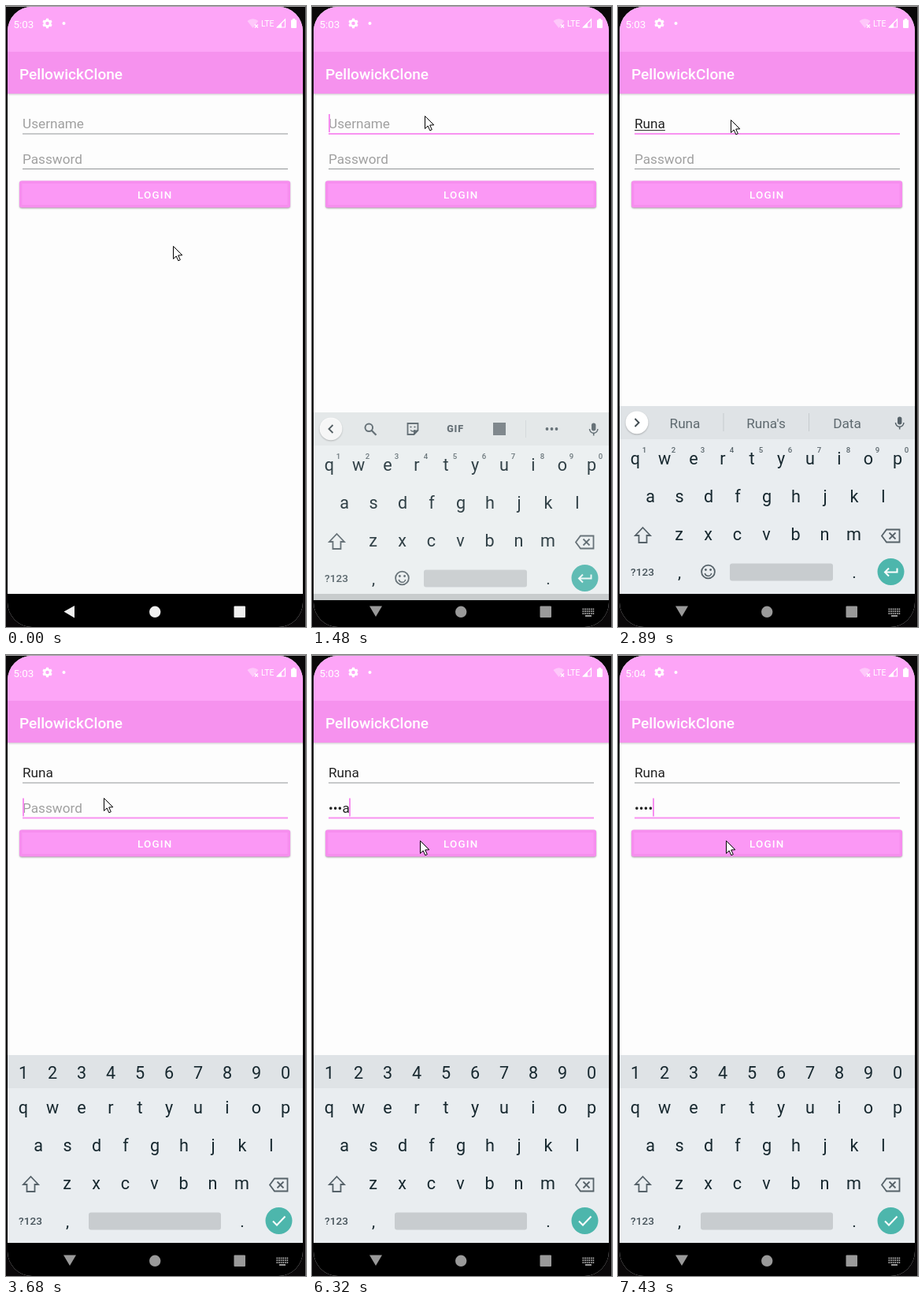
An HTML page with a canvas that plays this animation: 381 by 787 pixels, repeating every 8 s.

```html
<!DOCTYPE html>
<html lang="en">
<head>
<meta charset="utf-8">
<style>
html, body { margin: 0; width: 100%; height: 100%; overflow: hidden; background: #0a0809; }
canvas { display: block; }
</style>
</head>
<body>
<canvas id="stage" width="381" height="787"></canvas>
<script>
const ctx = document.getElementById('stage').getContext('2d');
const LOOP = 8000;
const PINK = '#f78ff0', KEY = '#17282f', ICON = '#566269';

// Held values: [start time, ...values]
const pointer = [
  [0, 212, 304], [150, 207, 278], [280, 186, 205], [410, 160, 136],
  [540, 148, 123], [670, 143, 139], [2890, 143, 144], [3020, 139, 154],
  [3200, 130, 172], [3390, 124, 181], [5900, 125, 188], [6050, 130, 208],
  [6190, 135, 228], [6320, 137, 235]
];
const userText = [[0, ''], [1900, 'R'], [2220, 'Run'], [2340, 'Runa']];
const passText = [[0, ''], [4350, 'R'], [5130, '•u'], [5270, '••n'], [5400, '•••a'], [6850, '••••']];
const suggestions = [
  [1900, 'Run', 'Real', 'Read'], [2220, 'Run', 'Runs', 'Runa'], [2340, 'Runa', "Runa's", 'Data']
];
const userCaret = [[0, false], [940, true], [2890, false]];
const passCaret = [
  [0, false], [3390, true], [4100, false], [4350, true], [4880, false],
  [5130, true], [5900, false], [6320, true], [6850, false], [7280, true]
];

const held = (list, t) => list.filter(k => k[0] <= t).pop().slice(1);
const between = (t, a, b) => t >= a && t < b;

function rect(x, y, w, h, color) {
  ctx.fillStyle = color;
  ctx.fillRect(x, y, w, h);
}
function round(x, y, w, h, r, color) {
  ctx.beginPath();
  ctx.roundRect(x, y, w, h, r);
  ctx.fillStyle = color;
  ctx.fill();
}
function disc(x, y, r, color) {
  ctx.beginPath();
  ctx.arc(x, y, r, 0, Math.PI * 2);
  ctx.fillStyle = color;
  ctx.fill();
}
function path(points, closed) {
  ctx.beginPath();
  points.forEach(([x, y]) => ctx.lineTo(x, y));
  if (closed) ctx.closePath();
}
function poly(points, color) {
  path(points, true);
  ctx.fillStyle = color;
  ctx.fill();
}
function stroke(points, color, width, closed) {
  path(points, closed);
  strokePath(color, width);
}
function strokePath(color, width) {
  ctx.strokeStyle = color;
  ctx.lineWidth = width;
  ctx.stroke();
}
function ring(x, y, r, color, width, from = 0, to = Math.PI * 2) {
  ctx.beginPath();
  ctx.arc(x, y, r, from, to);
  strokePath(color, width);
}
function text(str, x, y, size, color, { weight = 400, align = 'left', spacing = 0 } = {}) {
  ctx.font = `${weight} ${size}px Roboto, sans-serif`;
  ctx.letterSpacing = spacing + 'px';
  ctx.textAlign = align;
  ctx.fillStyle = color;
  ctx.fillText(str, x, y);
  return ctx.measureText(str).width;
}

function drawStatus(t) {
  rect(2, 1, 375, 57, '#fda5f7');
  rect(2, 58, 375, 53, '#f692ee');
  text(t < 7280 ? '5:03' : '5:04', 9.5, 27.5, 13.4, '#fff');

  ring(52.5, 22, 3.7, '#fff', 2.8);
  for (let i = 0; i < 6; i++) {
    const a = Math.PI / 6 + i * Math.PI / 3, c = Math.cos(a), s = Math.sin(a);
    stroke([[52.5 + c * 4, 22 + s * 4], [52.5 + c * 6.3, 22 + s * 6.3]], '#fff', 3);
  }
  disc(73.5, 22, 2, '#fff');

  ctx.beginPath();
  ctx.moveTo(313.5, 28);
  ctx.lineTo(306.5, 19);
  ctx.quadraticCurveTo(313.5, 13.5, 320.5, 19);
  ctx.closePath();
  ctx.fillStyle = 'rgba(255,255,255,.38)';
  ctx.fill();
  stroke([[316, 23.5], [320, 27.5]], '#fff', 1.2);
  stroke([[320, 23.5], [316, 27.5]], '#fff', 1.2);
  text('LTE', 324, 26, 10.4, '#fff');
  stroke([[344.5, 27], [354.5, 27], [354.5, 17]], '#fff', 1.2, true);
  poly([[343.5, 27.5], [350, 27.5], [350, 21]], '#fff');
  round(362, 17.5, 7, 10.5, 1, '#fff');
  rect(364, 16, 3, 2, '#fff');

  text('PellowickClone', 17, 92.5, 19.1, '#fff', { weight: 500 });
  rect(2, 111, 375, 1, '#dcd3db');
  rect(2, 112, 375, 1, '#ebe8eb');
  rect(2, 113, 375, 1, '#f6f5f6');
}

function drawField(value, hint, baseline, focused, caret) {
  const width = value ? text(value, 21, baseline, 17.2, '#222') : 0;
  if (!value) text(hint, 21, baseline, 17.2, '#a0a0a0');
  if (focused) rect(21, baseline + 6, 337, 2, '#f893f1');
  else rect(21, baseline + 6.5, 337, 1, '#929598');
  if (caret) rect(Math.round(20.5 + width), baseline - 18, 2, 23, PINK);
  return width;
}

function drawForm(t) {
  const [user] = held(userText, t), [pass] = held(passText, t);
  const width = drawField(user, 'Username', 155, between(t, 940, 3390), held(userCaret, t)[0]);
  if (user && t < 3680) rect(21, 157, width, 1, '#333');
  drawField(pass, 'Password', 199.5, t >= 3390, held(passCaret, t)[0]);

  const pressed = between(t, 6580, 6850);
  ctx.save();
  ctx.shadowColor = 'rgba(0,0,0,.35)';
  ctx.shadowBlur = pressed ? 5 : 2;
  ctx.shadowOffsetY = pressed ? 2 : 1;
  round(17, 221.5, 344, 34, 3, '#f68eee');
  ctx.restore();
  rect(20.5, 225, 337, 27, '#fb98f5');
  if (pressed) {
    ctx.save();
    ctx.beginPath();
    ctx.roundRect(17, 221.5, 344, 34, 3);
    ctx.clip();
    disc(137, 235, (t - 6480) * 0.7, 'rgba(255,255,255,.2)');
    ctx.restore();
  }
  text('LOGIN', 167, 244, 13.4, '#fff', { weight: 500, spacing: 1.2 });
}

function drawMic() {
  round(355, 520.5, 5.4, 10, 2.7, ICON);
  ring(357.7, 528, 5.2, ICON, 1.5, 0, Math.PI);
  rect(356.9, 533, 1.6, 3.5, ICON);
}

function drawChevron(dir) {
  ctx.save();
  ctx.shadowColor = 'rgba(0,0,0,.25)';
  ctx.shadowBlur = 2;
  ctx.shadowOffsetY = 1;
  disc(24, 527.8, 14.4, '#fff');
  ctx.restore();
  stroke([[24 - dir * 2.5, 523], [24 + dir * 2.5, 528], [24 - dir * 2.5, 533]], '#3f4a50', 1.9);
}

function drawToolbar() {
  drawChevron(-1);
  ring(72.3, 526.3, 4.8, ICON, 2);
  stroke([[75.8, 530], [81.5, 535.7]], ICON, 2.3);

  stroke([[121.5, 521], [134.5, 521], [134.5, 530], [129.5, 535], [121.5, 535]], ICON, 1.8, true);
  poly([[129, 535.5], [129, 529.5], [135, 529.5]], ICON);
  disc(125.5, 525.5, 1.1, ICON);
  disc(130.5, 525.5, 1.1, ICON);
  ring(128, 528, 3, ICON, 1.4, 0.4, 2.7);

  text('GIF', 182, 532.2, 12.5, ICON, { weight: 900, align: 'center', spacing: 0.8 });
  rect(230, 520, 16, 16, '#727c81');
  rect(271, 517, 1, 22, '#d3d8da');
  [298.5, 304.5, 310.5].forEach(x => disc(x, 528, 1.9, ICON));
  drawMic();
}

function drawSuggestions(t) {
  drawChevron(1);
  held(suggestions, t).forEach((word, i) =>
    text(word, 85 + i * 103, 534.5, 17.2, '#5e696f', { align: 'center' }));
  rect(133.5, 516, 1, 23, '#c6cbce');
  rect(242, 516, 1, 23, '#c6cbce');
  drawMic();
}

function keyRow(keys, x, y) {
  [...keys].forEach((key, i) => text(key, x + i * 37, y, 21.6, KEY, { align: 'center' }));
}

function drawActionKey(numeric) {
  disc(346.5, 717, 17, '#4db6ac');
  if (numeric) {
    stroke([[339, 717.5], [344, 722.5], [354.5, 711.5]], '#fff', 2);
  } else {
    stroke([[354.5, 712.5], [354.5, 717.5], [339, 717.5]], '#fff', 2);
    stroke([[344, 712.5], [339, 717.5], [344, 722.5]], '#fff', 2);
  }
}

function drawKeyboard(t) {
  const sliding = t < 1630, numeric = t >= 3680;
  ctx.save();
  if (sliding) {
    ctx.translate(0, 8);
    rect(2, 736, 375, 9, '#c8cccd');
  }
  rect(2, 507, 375, 42, sliding ? '#e4e8e9' : '#dfe3e6');
  rect(2, 549, 375, sliding ? 188 : 196, sliding ? '#ecf0f1' : '#e9edf0');
  ctx.globalAlpha = sliding ? 0.88 : 1;

  if (numeric) keyRow('1234567890', 22, 536.5);
  else if (t < 1900) drawToolbar();
  else drawSuggestions(t);

  keyRow('qwertyuiop', 22, 580.5);
  if (!numeric) [...'1234567890'].forEach((n, i) =>
    text(n, 33.5 + i * 37, 565.5, 9.6, '#59656b', { align: 'center', weight: 500 }));
  keyRow('asdfghjkl', 41, 628.5);
  keyRow('zxcvbnm', 77.5, 677);

  stroke([[31.5, 661], [41, 671], [36.5, 671], [36.5, 680], [26.5, 680], [26.5, 671], [22, 671]],
    ICON, 1.8, true);
  stroke([[335, 671.5], [341, 663.5], [357.5, 663.5], [357.5, 679.5], [341, 679.5]], ICON, 1.8, true);
  stroke([[344.5, 667.5], [352.5, 675.5]], ICON, 1.8);
  stroke([[352.5, 667.5], [344.5, 675.5]], ICON, 1.8);

  text('?123', 31, 722, 13.6, '#46535a', { weight: 500, align: 'center' });
  text(',', 78, 724.5, 21, KEY, { align: 'center' });
  text('.', 300, 724.5, 21, KEY, { align: 'center' });
  if (!numeric) {
    ring(114.5, 717, 8.4, ICON, 1.8);
    disc(111.4, 714.5, 1.4, ICON);
    disc(117.6, 714.5, 1.4, ICON);
    ring(114.5, 718, 4.3, ICON, 1.6, 0.2, Math.PI - 0.2);
  }
  const left = numeric ? 105 : 142;
  round(left, 706.5, 273 - left, 22, 3, '#c8cccf');
  drawActionKey(numeric);
  ctx.restore();
}

function drawNav(t) {
  const top = between(t, 1480, 1630) ? 753 : 745;
  rect(2, top, 375, 787 - top, '#000');
  const fade = Math.min(Math.max((t - 150) / 520, 0), 1);
  const level = Math.round(240 - 86 * fade);
  const color = `rgb(${level},${level},${level})`;
  poly(t < 1480 ? [[73.5, 767.5], [87, 760], [87, 775.5]] : [[73, 760.5], [89, 760.5], [81, 774]], color);
  disc(189.2, 767.8, 7.2, color);
  round(289.5, 760.5, 14.5, 14.5, 1, t < 940 ? '#f0f0f0' : '#9a9a9a');
  if (t >= 940) {
    for (let row = 0; row < 3; row++)
      for (let col = 0; col < 6; col++)
        rect(343.5 + col * 2.6, 763.5 + row * 2.8, 1.7, 1.8, '#aaa');
    rect(347, 772, 8, 1.8, '#aaa');
  }
}

function drawPointer(t) {
  const [x, y] = held(pointer, t);
  ctx.save();
  ctx.translate(x + 0.5, y + 0.5);
  const arrow = [[0, 0], [0, 16], [3.7, 12.5], [6.3, 18.3], [8.8, 17.2], [6.2, 11.5], [11.3, 11.3]];
  poly(arrow, '#fff');
  stroke(arrow, '#000', 1, true);
  ctx.restore();
}

function draw(t) {
  rect(0, 0, 381, 787, '#0a0809');
  rect(0, 0, 381, 1, '#a5a5a5');
  rect(380, 0, 1, 787, '#6d6d6d');
  ctx.save();
  ctx.beginPath();
  ctx.roundRect(2, 1, 375, 786, 31);
  ctx.clip();
  rect(2, 1, 375, 786, '#fdfdfd');
  drawStatus(t);
  drawForm(t);
  if (t >= 1480) drawKeyboard(t);
  drawNav(t);
  ctx.restore();
  drawPointer(t);
}

function frame() {
  draw(performance.now() % LOOP);
  requestAnimationFrame(frame);
}
frame();
</script>
</body>
</html>
```
